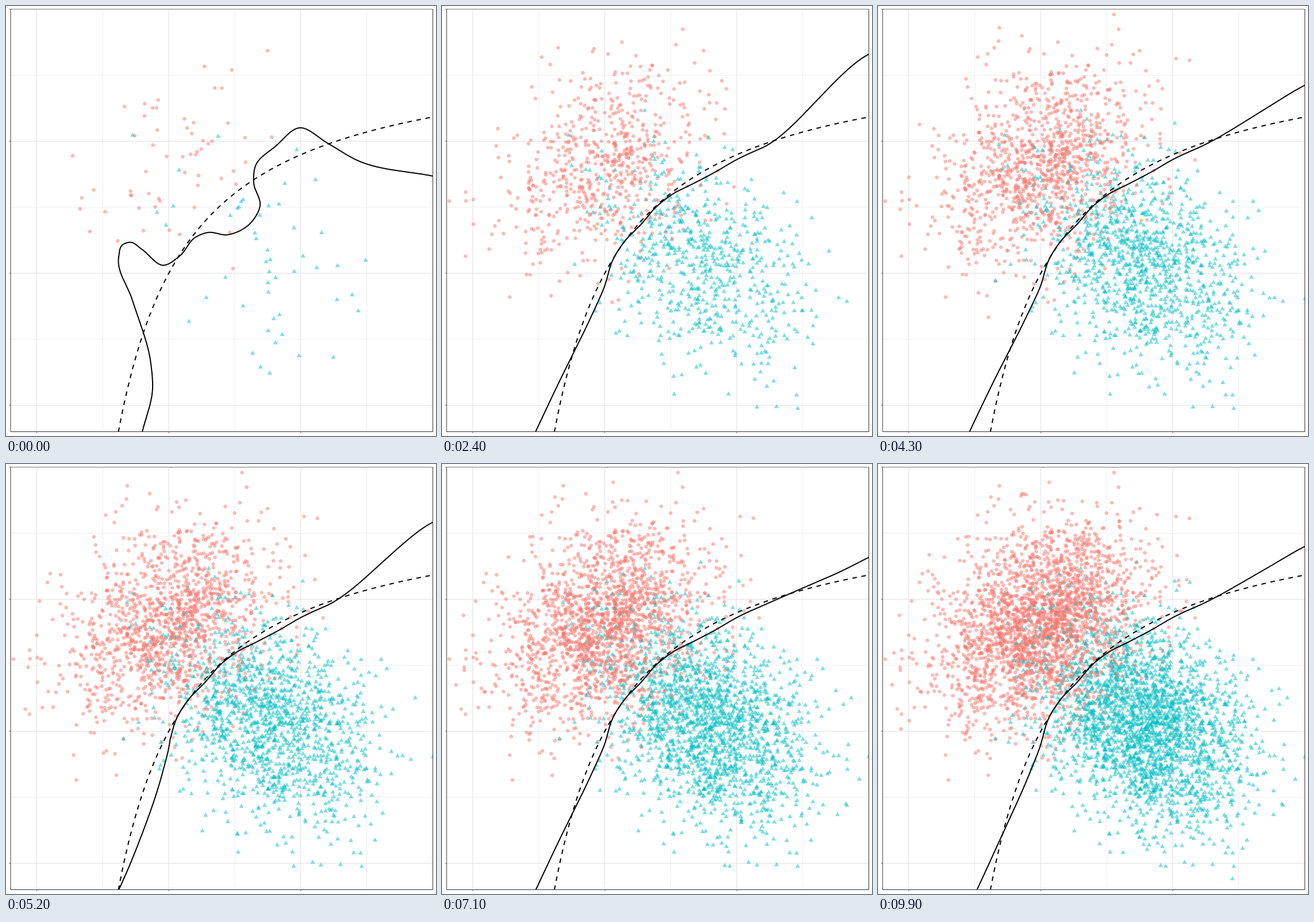
These frames come from a looping animation (748 by 748 pixels, 10000 ms). A matplotlib script:

```python
import numpy as np
import matplotlib.pyplot as plt
from matplotlib.animation import FuncAnimation
from matplotlib.collections import PathCollection
from matplotlib.colors import to_rgba
from matplotlib.patches import Rectangle
from matplotlib.path import Path
from matplotlib.transforms import IdentityTransform

SIZE, DPI = 748, 100
FRAMES, STEP_MS = 100, 100
LEFT, RIGHT, TOP, BOTTOM = 8, 742.5, 5.5, 740.5
UNIT = 229.6           # pixels between major grid lines
PER_STEP = 25          # new points of each class per step
SETTLE = 14            # steps until the first wild fit has calmed down
RED, BLUE = to_rgba("#F8766D", 0.5), to_rgba("#00BFC4", 0.5)
rng = np.random.default_rng(11)


def px(width):
    return width * 72 / DPI


# ---------- sample points ----------

def sample(first, center, sd, corr):
    """Rows of x, y, step of arrival for one correlated normal class."""
    n = first + PER_STEP * (FRAMES - 1)
    z = rng.normal(size=(2 * n, 2))
    z = z[np.hypot(*z.T) < 3.3][:n]
    z[:, 1] = corr * z[:, 0] + np.sqrt(1 - corr ** 2) * z[:, 1]
    born = np.maximum(0, (np.arange(n) - first) // PER_STEP + 1)
    return np.column_stack([z * sd + center, born])


reds = sample(59, (281, 278), (86, 87), -0.3)
blues = sample(51, (466, 450), (89, 89), 0.3)
points = np.vstack([reds, blues])
is_blue = np.arange(len(points)) >= len(reds)
order = np.lexsort((rng.random(len(points)), points[:, 2]))
points, is_blue = points[order], is_blue[order]

disc = Path(Path.unit_circle().vertices * 3.2, Path.unit_circle().codes)
triangle = Path([(0, 4.4), (4.1, -2.8), (-4.1, -2.8), (0, 4.4)], closed=True)
shapes = [triangle if b else disc for b in is_blue]
colors = np.where(is_blue[:, None], BLUE, RED)

# ---------- boundaries ----------

# The first fit follows single points; later fits share one calm middle part.
WILD = [(237, 741), (255, 665), (252, 622), (220, 512), (196, 437), (202, 416),
        (217, 411), (236, 423), (275, 451), (302, 435), (330, 402), (351, 394),
        (385, 398), (425, 378), (442, 347), (431, 308), (434, 278), (470, 243),
        (510, 212), (560, 239), (610, 268), (743, 296)]
CALM = [(165, 741), (203, 660), (260, 541), (282, 490), (298, 440), (318, 409),
        (347, 379), (372, 350), (400, 328), (437, 309), (475, 289), (513, 267),
        (570, 241), (630, 214), (690, 187), (743, 160)]

# Where the loose ends of the fit swing to: step, x at the bottom, y at the right.
SWING = np.array([(14, 194, 260), (28, 150, 13), (34, 122, 174), (52, 196, 101),
                  (71, 163, 162), (85, 145, 184), (99, 172, 143)])


def chords(p):
    steps = np.hypot(*np.diff(p, axis=0).T)
    return np.concatenate([[0], np.cumsum(steps)])


def smooth(knots, n=400):
    """Cubic Hermite curve through the knots, evenly spaced along its length."""
    p = np.array(knots, float)
    t = chords(p)
    m = np.gradient(p, t, axis=0)
    u = np.linspace(0, t[-1], 4 * n)
    i = np.clip(np.searchsorted(t, u, side="right") - 1, 0, len(t) - 2)
    h = (t[i + 1] - t[i])[:, None]
    s = (u - t[i])[:, None] / h
    curve = ((1 + 2 * s) * (1 - s) ** 2 * p[i] + s * (1 - s) ** 2 * h * m[i]
             + s ** 2 * (3 - 2 * s) * p[i + 1] + s ** 2 * (s - 1) * h * m[i + 1])
    d = chords(curve)
    even = np.linspace(0, d[-1], n)
    return np.column_stack([np.interp(even, d, c) for c in curve.T])


def ease(u):
    u = np.clip(u, 0, 1)
    return u * u * (3 - 2 * u)


wild, calm = smooth(WILD), smooth(CALM)
low_pull = np.sin(np.clip((calm[:, 1] - 480) / 261, 0, 1) * np.pi / 2)
high_pull = ease((calm[:, 0] - 555) / 188)


def fit_at(step):
    x_end, y_end = (np.interp(step, SWING[:, 0], SWING[:, k]) for k in (1, 2))
    curve = calm.copy()
    curve[:, 0] += low_pull * (x_end - CALM[0][0])
    curve[:, 1] += high_pull * (y_end - CALM[-1][1])
    return wild + (curve - wild) * ease(step / SETTLE)


def ideal(x):
    return 66.4 + 85338 / (x - 69)


# ---------- stage ----------

fig = plt.figure(figsize=(SIZE / DPI, SIZE / DPI), dpi=DPI, facecolor="white")
ax = fig.add_axes([0, 0, 1, 1])
ax.set(xlim=(0, SIZE), ylim=(SIZE, 0))
ax.axis("off")
panel = Rectangle((LEFT, TOP), RIGHT - LEFT, BOTTOM - TOP, fc="none", ec="none")
ax.add_patch(panel)


def rule(xs, ys, color, z):
    ax.plot(xs, ys, color=color, lw=px(1), zorder=z, snap=False,
            solid_capstyle="butt")


def down(x, color, y0=TOP, y1=BOTTOM, z=1):
    rule((x, x), (y0, y1), color, z)


def across(y, color, x0=LEFT, x1=RIGHT, z=1):
    rule((x0, x1), (y, y), color, z)


for k in range(3):
    x, y = 53.6 + k * UNIT, 235.3 + k * UNIT
    down(x + UNIT / 2, "#eeeeee")
    across(y - UNIT / 2, "#eeeeee")
    down(x, "#dfdfdf", z=2)
    across(y, "#dfdfdf", z=2)
    down(x, "#777777", BOTTOM, 743, 6)
    across(y, "#777777", 5.5, LEFT, 6)
across(TOP, "#777777", 5.5, RIGHT, 6)
down(LEFT, "#333333", z=6)
down(RIGHT, "#333333", z=6)
across(BOTTOM, "#333333", z=6)

dots = PathCollection([disc], offsets=points[:1, :2], offset_transform=ax.transData,
                      transform=IdentityTransform(), linewidths=0,
                      edgecolors="none", zorder=3)
# Without this the marker outlines would be placed in data units.
dots.set_transform(IdentityTransform())
ax.add_collection(dots, autolim=False)
fit_line, = ax.plot([], [], color="black", lw=px(2), zorder=4,
                    solid_joinstyle="round", solid_capstyle="butt")
xs = np.linspace(195.5, 743, 600)
ideal_line, = ax.plot(xs, ideal(xs), color="black", lw=px(2), zorder=5,
                      ls=(0, (4, 4)), dash_capstyle="butt")
for artist in (dots, fit_line, ideal_line):
    artist.set_clip_path(panel)


def update(step):
    n = np.searchsorted(points[:, 2], step, side="right")
    dots.set_paths(shapes[:n])
    dots.set_offsets(points[:n, :2])
    dots.set_facecolor(colors[:n])
    fit_line.set_data(*fit_at(step).T)
    return dots, fit_line


anim = FuncAnimation(fig, update, frames=FRAMES, interval=STEP_MS,
                     repeat=True, repeat_delay=0)
plt.show()
```
